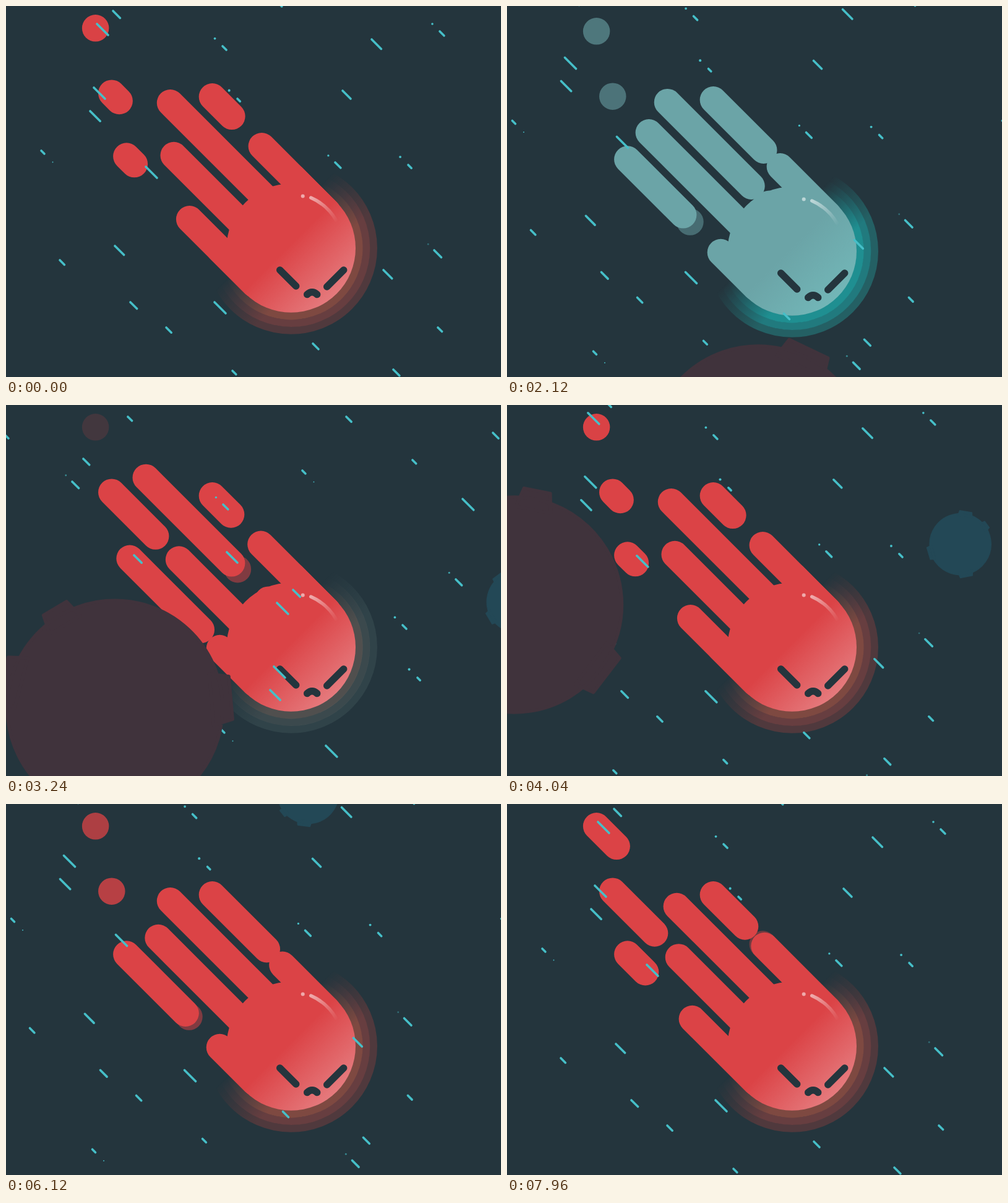
Write an HTML page that moves like this. It is 800 by 600 pixels and loops after 8 s.

```html
<!DOCTYPE html>
<html lang="en">
<head>
<meta charset="utf-8">
<title>Angry comet</title>
<style>
  html, body { margin: 0; width: 100%; height: 100%; overflow: hidden; background: #24353d; }
  svg { display: block; width: 100vw; height: 100vh; }
</style>
</head>
<body>
<svg viewBox="0 0 800 600" xmlns="http://www.w3.org/2000/svg">
  <defs>
    <linearGradient id="skin" gradientUnits="userSpaceOnUse" x1="-5" x2="104">
      <stop id="skinBase"/><stop id="skinLight" offset="1"/>
    </linearGradient>
    <linearGradient id="fade" gradientUnits="userSpaceOnUse" x1="-38" x2="48">
      <stop stop-color="#fff" stop-opacity="0"/><stop offset="1" stop-color="#fff"/>
    </linearGradient>
    <linearGradient id="gloss" gradientUnits="userSpaceOnUse" x1="32" y1="-81" x2="74" y2="-42">
      <stop stop-color="#fff" stop-opacity=".55"/><stop offset="1" stop-color="#fff" stop-opacity="0"/>
    </linearGradient>
    <mask id="front" maskUnits="userSpaceOnUse" x="-150" y="-150" width="300" height="300">
      <rect x="-150" y="-150" width="300" height="300" fill="url(#fade)"/>
    </mask>
    <g id="tile" stroke-width="3.6" stroke-linecap="round"></g>
    <path id="rock" stroke-width=".03" stroke-linejoin="round"/>
  </defs>

  <rect width="800" height="600" fill="#24353d"/>
  <use id="bluePlanet" href="#rock" fill="#234856" stroke="#234856"/>

  <g id="comet">
    <g transform="rotate(45)">
      <g id="rings" mask="url(#front)" fill="none" stroke-width="12.2"></g>
      <g id="trails" stroke-width="43.5" stroke-linecap="round"></g>
      <circle r="104.3" fill="url(#skin)"/>
    </g>
    <g fill="none" stroke="#24353d" stroke-linecap="round" stroke-width="11.5">
      <path d="M-18 35.5L8 61.5M85 35.5L58 62.5M26 75Q34 67.5 42 75"/>
    </g>
    <circle cx="19" cy="-84" r="3" fill="#fff" fill-opacity=".55"/>
    <path d="M32 -81.5A87 87 0 0 1 73 -44.5" fill="none" stroke="url(#gloss)" stroke-width="5.5" stroke-linecap="round"/>
  </g>

  <g id="stars" stroke="#46bfc8" fill="#46bfc8"></g>
  <use id="redPlanet" href="#rock" fill="#40333c" stroke="#40333c"/>
</svg>

<script>
const FRAME = 40, FRAMES = 200, TILE = 792;
const byId = id => document.getElementById(id);

function set(node, attrs) {
  for (const key in attrs) node.setAttribute(key, attrs[key]);
}
function add(parent, tag, attrs) {
  const node = document.createElementNS('http://www.w3.org/2000/svg', tag);
  set(node, attrs);
  return parent.appendChild(node);
}
const clamp = x => Math.max(0, Math.min(1, x));
const ramp = (x, [a, b]) => clamp((x - a) / (b - a));
const lerp = (a, b, k) => a + (b - a) * k;
const blend = (a, b, k) => `rgb(${a.map((c, j) => Math.round(lerp(c, b[j], k)))})`;
// Rises from a to b, falls from c to d.
const swell = (x, a, b, c, d) => ramp(x, [a, b]) * (1 - ramp(x, [c, d]));

// Stars, longest first; each list shrinks by a fixed step.
const dashes = [
  [147, 29], [142, 132], [226, 260], [337, 479], [447, 653], [66, 739], [136, 170],
  [591, 54], [176, 388], [610, 427], [544, 137], [708, 744], [173, 8], [201, 479],
  [626, 588], [496, 546], [259, 520], [87, 411], [698, 520], [366, 590]
];
const led = [
  [692, 395], [608, 625], [436, 783], [532, 253], [60, 662],
  [701, 41], [350, 65], [650, 257], [374, 150]
];
const followed = [[57, 234], [188, 607]];

function addDash([x, y], len) {
  add(byId('tile'), 'path', { d: `M${x} ${y}l${len} ${len}` });
}
function addDot([x, y], shift, r, opacity) {
  add(byId('tile'), 'circle', { cx: x + shift, cy: y + shift, r, opacity, stroke: 'none' });
}
dashes.forEach((p, j) => addDash(p, Math.min(18, 21 - .8 * j)));
led.forEach((p, j) => {
  const len = 11.5 - .9 * j;
  addDash(p, len);
  addDot(p, len / 2 - 15.5, 1.4 + .08 * j, Math.min(1, .4 + .2 * j));
});
followed.forEach(p => {
  addDash(p, 5);
  addDot(p, 18.5, .9, 1);
});
for (const x of [-TILE, 0, TILE])
  for (const y of [-TILE, 0, TILE]) add(byId('stars'), 'use', { href: '#tile', x, y });

// Unit planet: a disc with four blocks on its rim (angle, half width)
let outline = 'M-1 0A1 1 0 0 1 1 0A1 1 0 0 1 -1 0Z';
for (const [deg, half] of [[0, .2], [-116, .125], [-160, .2], [84, .2]]) {
  const a = deg * Math.PI / 180, c = Math.cos(a), s = Math.sin(a);
  const corners = [[.9, -half - .04], [1.08, -half], [1.08, half], [.9, half + .04]];
  outline += 'M' + corners.map(([u, v]) => [u * c - v * s, u * s + v * c].map(n => n.toFixed(3))).join('L') + 'Z';
}
byId('rock').setAttribute('d', outline);

// A flame grows out of the body to `rest`, shoots on to `end`, then its tail catches up.
const CYCLE = 101, HIDDEN = 80, NECK = 110, GATE = 150, GROW = [-11.5, -2.5];
const lanes = [
  { y: -83, rate: 5, rest: 150, end: 263, shoot: [0, 11.5], leave: [8.5, 25] },
  { y: -28, rate: 4, rest: 304, end: 475, shoot: [2, 12], leave: [1.8, 25.2] },
  { y: 28, rate: 6, rest: 240, end: 382, shoot: [0, 6], leave: [7.1, 17.5] },
  { y: 83, rate: 3, rest: 149, end: 293, shoot: [2, 14.3], leave: [12, 36] }
];
for (const lane of lanes) {
  lane.dot = add(byId('trails'), 'circle', { cx: -GATE, cy: lane.y, r: 21.75 });
  lane.flames = [-1, 0, 1].map(() => add(byId('trails'), 'path', {}));
}

function drawLane({ y, rate, rest, end, shoot, leave, dot, flames }, frame, color) {
  const period = CYCLE / rate, phase = frame % CYCLE % period;
  const tailAt = age => age < leave[0] ? 0 : lerp(NECK, end, ramp(age, leave));
  flames.forEach((flame, j) => {
    const age = phase + (j - 1) * period;
    const head = lerp(HIDDEN, rest, ramp(age, GROW)) + (end - rest) * ramp(age, shoot);
    const tail = Math.min(tailAt(age), head - .01);
    const opacity = 1 - ramp(age, [leave[1], leave[1] + period / 4]);
    set(flame, { d: `M${-head} ${y}H${-tail}`, stroke: color, opacity });
  });
  const tail = tailAt(phase);
  set(dot, { fill: color, opacity: tail < GATE ? 0 : .5 * (1 - ramp(tail, [185, 215])) });
}

const RED = [219, 67, 70], TEAL = [107, 164, 167];
const RED_LIGHT = [229, 122, 125], TEAL_LIGHT = [114, 182, 183];
const rings = [
  { r: 133.2, warm: [80, 57, 61], cool: [36, 96, 100] },
  { r: 121.5, warm: [103, 62, 64], cool: [33, 122, 126] },
  { r: 109.8, warm: [126, 73, 65], cool: [31, 143, 145] }
];
for (const ring of rings) ring.node = add(byId('rings'), 'circle', { r: ring.r });

function place(id, x, y, size, angle) {
  byId(id).setAttribute('transform', `translate(${x} ${y}) rotate(${angle}) scale(${size})`);
}

function draw(frame) {
  const chill = swell(frame, 31, 41, 68, 80);
  const color = blend(RED, TEAL, chill);
  byId('skinBase').setAttribute('stop-color', color);
  byId('skinLight').setAttribute('stop-color', blend(RED_LIGHT, TEAL_LIGHT, chill));
  rings.forEach(({ node, warm, cool }, j) => {
    const late = frame - 2 * (2 - j);
    const mix = swell(late, 20, 28, 70, 85);
    set(node, { stroke: blend(warm, cool, mix), opacity: 1 - 1.6 * mix * (1 - mix) });
  });

  const shake = swell(frame, 22, 29, 70, 79);
  const dx = 4 * shake * Math.sin(2.215 * (frame - 53));
  const dy = 5 * shake * Math.cos(2.527 * (frame - 53));
  byId('comet').setAttribute('transform', `translate(${460.7 + dx} ${391.5 + dy})`);
  for (const lane of lanes) drawLane(lane, frame, color);

  const drift = frame % 50 / 49 % 1 * TILE;
  byId('stars').setAttribute('transform', `translate(${-drift} ${-drift})`);

  const red = frame - 81, blue = frame - 122;
  place('redPlanet', 176 - 8.22 * red, 490 - 8.35 * red, 174, -5 + 2.12 * red);
  place('bluePlanet', 634 - 4.7 * blue, 127 - 4.67 * blue, 49.5, 6 - 3.5 * blue);
}

const start = performance.now();
function tick() {
  draw(Math.floor((performance.now() - start) / FRAME) % FRAMES);
  requestAnimationFrame(tick);
}
tick();
</script>
</body>
</html>
```
